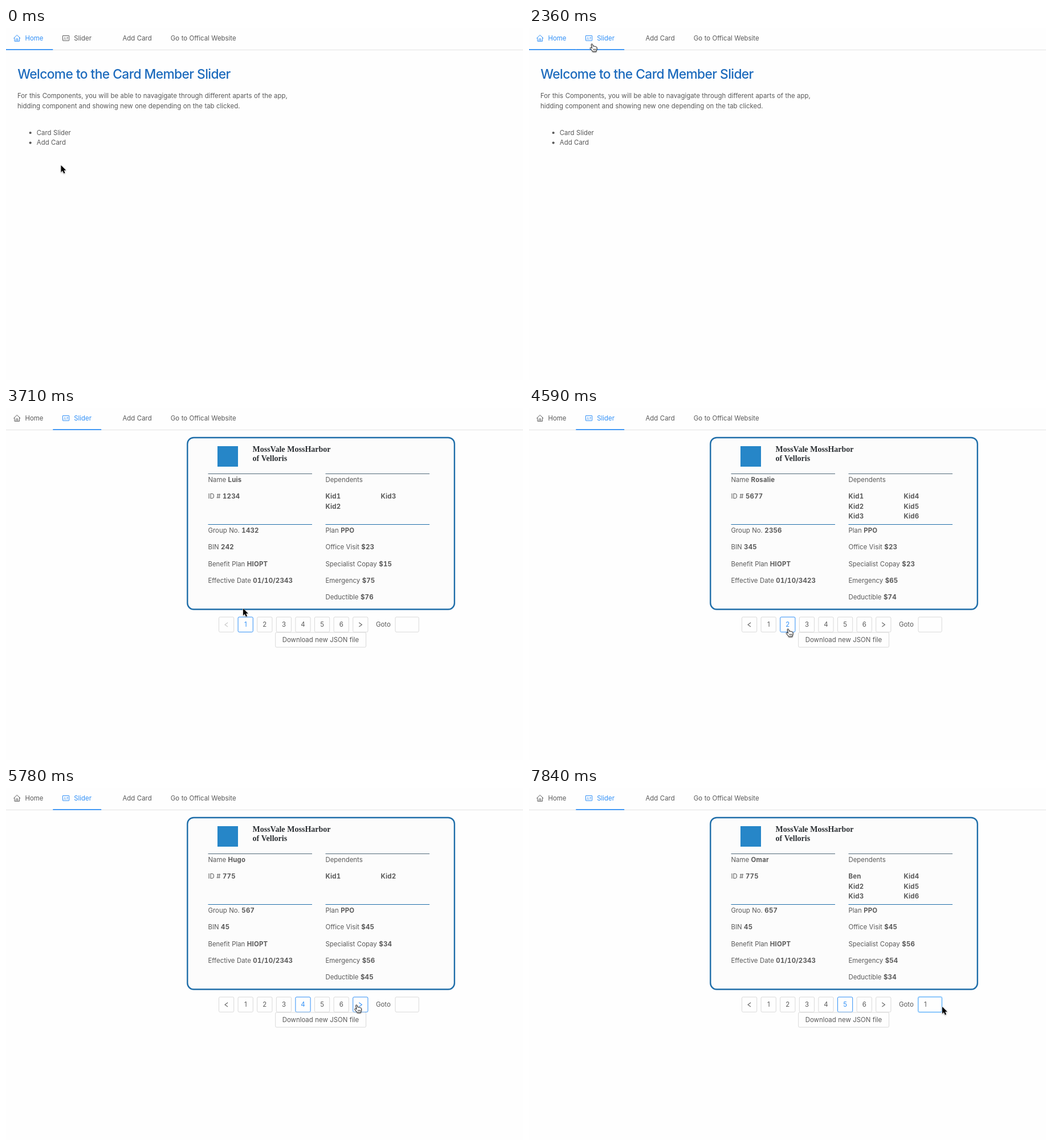
An HTML page that plays this animation: 907x618 px, repeating every 8 s.

```html
<!DOCTYPE html>
<html lang="en">
<head>
<meta charset="utf-8">
<title>Card slider</title>
<style>
html, body { margin: 0; width: 100%; height: 100%; overflow: hidden; background: #fefefe; }
svg { display: block; }
text { font: 11.4px Inter, "Open Sans", sans-serif; font-optical-sizing: none; word-spacing: .3px; fill: #595959; }
.b { font-weight: 700; letter-spacing: .2px; font-variant-numeric: tabular-nums; }
.blue { fill: #2f8ff7; }
.mid { text-anchor: middle; }
.title { font-size: 22.8px; font-weight: 500; letter-spacing: -.65px; fill: #1d6bbd; }
.brand { font: 700 14px "Liberation Serif", serif; fill: #2b2f33; }
.pointer { filter: drop-shadow(0 1px 1px #0005); }
</style>
</head>
<body>
<svg id="stage" width="907" height="618" viewBox="0 0 907 618"></svg>
<script>
const LOOP = 8000, BLUE = '#2f8ff7', GREY = '#595959', EDGE = '#d9d9d9', CARD = '#1f6ea9';
const stage = document.getElementById('stage');

// Pointer stops: time, x, y, shape
const stops = [
  [0, 96.5, 241, 'arrow'], [140, 94, 226, 'arrow'], [290, 82, 165, 'arrow'], [440, 56, 85, 'arrow'],
  [590, 34, 32, 'hand'], [740, 22, 21, 'hand'], [890, 50, 19, 'hand'], [1040, 98, 19, 'arrow'],
  [1180, 106, 22, 'hand'], [1330, 109, 25, 'hand'], [1480, 113, 36, 'hand'], [1620, 117, 65, 'arrow'],
  [1770, 120, 96, 'arrow'], [1920, 120, 110, 'arrow'], [2070, 117, 82, 'arrow'], [2210, 113, 45, 'arrow'],
  [2360, 111, 28, 'hand'], [2960, 113, 29, 'hand'], [3110, 126, 40, 'arrow'], [3260, 196, 77, 'arrow'],
  [3410, 281, 154, 'arrow'], [3560, 359, 254, 'arrow'], [3710, 416, 352, 'arrow'],
  [3860, 430, 365, 'arrow'], [4010, 448, 381, 'hand'], [4150, 455, 388, 'hand'],
  [4740, 476, 388, 'hand'], [4890, 520, 387, 'hand'], [5040, 570, 385, 'hand'], [5180, 606, 383, 'arrow'],
  [5330, 615.5, 381, 'hand'], [6680, 677, 386, 'arrow'], [6830, 697, 381, 'beam'], [6970, 703, 381, 'beam'],
  [7120, 711, 382, 'beam'], [7260, 722, 383, 'beam'], [7410, 729, 384, 'arrow'], [7550, 727, 384, 'arrow'],
  [7700, 725, 384, 'arrow']
];

// When each page of the slider opens
const turns = [2810, 4590, 5480, 5780, 6080];

// name, id, group, bin, date, visit, specialist, emergency, deductible, dependents
const cards = [
  ['Luis', '1234', '1432', '242', '01/10/2343', 23, 15, 75, 76, 'Kid1 Kid2 Kid3'],
  ['Rosalie', '5677', '2356', '345', '01/10/3423', 23, 23, 65, 74, 'Kid1 Kid2 Kid3 Kid4 Kid5 Kid6'],
  ['Clara', '3456', '2345', '234', '01/10/2343', 34, 45, 65, 54, 'Kid1 Kid2 Kid3 Kid4'],
  ['Hugo', '775', '567', '45', '01/10/2343', 45, 34, 56, 45, 'Kid1 Kid2'],
  ['Omar', '775', '657', '45', '01/10/2343', 45, 56, 54, 34, 'Ben Kid2 Kid3 Kid4 Kid5 Kid6']
];

const text = (x, y, s, cls = '') => `<text x="${x}" y="${y}" class="${cls}">${s}</text>`;
const field = (x, y, label, value) => text(x, y, `${label} <tspan class="b">${value}</tspan>`);
const path = (d, stroke, width = 1, fill = 'none', extra = '') =>
  `<path d="${d}" stroke="${stroke}" stroke-width="${width}" fill="${fill}" ${extra}/>`;
const rect = (x, y, w, h, r, stroke, width = 1, fill = 'none') =>
  `<rect x="${x}" y="${y}" width="${w}" height="${h}" rx="${r}" stroke="${stroke}" stroke-width="${width}" fill="${fill}"/>`;

function nav(home, slider) {
  const ink = on => on ? BLUE : GREY, cls = on => on ? 'blue' : '';
  const c = ink(slider);
  return path('M0 38.5H907', '#e2e2e2') +
    (home ? path('M0 37.8H82.3', BLUE, 1.7) : '') +
    (slider ? path('M82.3 37.8H167.2', BLUE, 1.7) : '') +
    path('M13.3 18.2L19.3 12.4L25.3 18.2M15 17V23.2H23.6V17M17.9 23V19H20.7V23', ink(home)) +
    rect(99.5, 13.4, 11.2, 8.8, .4, c) +
    path('M101.6 20.2Q103.3 16.8 105 20.2M102.5 16.4H104.1M106.4 16.7H109M106.4 18.9H108.6', c) +
    text(33.5, 22, 'Home', cls(home)) + text(119.3, 22, 'Slider', cls(slider)) +
    text(204.5, 22, 'Add Card') + text(288.8, 22, 'Go to Offical Website');
}

function welcome() {
  return text(20.3, 88.5, 'Welcome to the Card Member Slider', 'title') +
    text(20, 122.8, 'For this Components, you will be able to navagigate through different aparts of the app,') +
    text(20, 140.6, 'hidding component and showing new one depending on the tab clicked.') +
    ['Card Slider', 'Add Card'].map((s, i) =>
      `<circle cx="42.7" cy="${184 + i * 17.6}" r="2.1" fill="${GREY}"/>` + text(53.8, 187.6 + i * 17.6, s)).join('');
}

function card([name, id, group, bin, date, visit, specialist, emergency, deductible, names]) {
  const L = 354.5, R = 560.5, row = i => 218.7 + i * 29.4;
  const kids = names.split(' '), half = Math.ceil(kids.length / 2);
  const left = [['Group No.', group], ['BIN', bin], ['Benefit Plan', 'HIOPT'], ['Effective Date', date]];
  const right = [['Plan', 'PPO'], ['Office Visit', '$' + visit], ['Specialist Copay', '$' + specialist],
    ['Emergency', '$' + emergency], ['Deductible', '$' + deductible]];
  const column = (x, rows) => rows.map(([k, v], i) => field(x, row(i), k, v)).join('');
  return rect(318.3, 52, 468.5, 301.5, 11, CARD, 2.4, '#fcfcfc') +
    '<rect x="371" y="67" width="36" height="36" fill="#2686c8"/>' +
    text(432.5, 77.3, 'MossVale MossHarbor', 'brand') + text(432.5, 93, 'of Velloris', 'brand') +
    path('M354.5 115.5H537M560.5 115.5H743', '#50687a') +
    path('M354.5 204.5H537M560.5 204.5H743', CARD) +
    field(L, 129.6, 'Name', name) + field(L, 159, 'ID #', id) + text(R, 129.6, 'Dependents') +
    kids.map((k, i) => text(i < half ? R : 657.5, 159 + i % half * 17.6, k, 'b')).join('') +
    column(L, left) + column(R, right);
}

function pager(page, hover, t) {
  let out = '';
  for (let i = 0; i < 8; i++) {
    const x = 373.5 + i * 33.6, off = i === 0 && page === 1;
    const on = !off && (i === page || i === hover);
    out += rect(x, 367, 26.2, 26.3, 2, on ? BLUE : EDGE, 1, '#fefefe');
    const cx = x + 13.1, d = i ? 2.5 : -2.5;
    out += i % 7 ? text(cx, 384.2, i, 'mid' + (on ? ' blue' : '')) :
      path(`M${cx - d} 376.7L${cx + d} 380.4L${cx - d} 384.1`, on ? BLUE : off ? '#c4c4c4' : GREY, 1.1);
  }
  const focus = t >= 6970;
  return out + text(649, 384.2, 'Goto') +
    (focus ? rect(682.3, 366.3, 42.6, 27.7, 3, '#d3e9fd', 2) : '') +
    rect(683, 367, 41.2, 26.3, 2, focus ? '#46a6fb' : EDGE, 1, '#fefefe') +
    (t >= 7550 ? text(693, 384.2, '1') : '') +
    (focus && t < 7840 ? path(`M${t >= 7550 ? 700.5 : 693.5} 372V387`, '#333') : '') +
    rect(472.7, 394, 158.8, 26, 2, EDGE, 1, '#fefefe') +
    text(552, 411.2, 'Download new JSON file', 'mid');
}

const shapes = {
  arrow: path('M0 0V12.2L2.8 9.6L4.9 14.3L7 13.4L5 8.8H8.8Z', '#fff', 1, '#000', 'paint-order="stroke"'),
  hand: path('M-1.7 1.2C-2 -.5 0 -.7 .5 .8L1.7 4.3C2 3.4 3.8 3.5 4 4.7C4.5 3.9 6 4.2 6.2 5.3' +
    'C7 4.7 8.1 5.3 8.1 6.5V9.2C8.1 10.5 7 11.3 7 12.6V13.6H.7C.5 11.9 -2.4 9.5 -3.6 7.7' +
    'C-4.3 6.5 -2.6 5.8 -1.5 6.8L-.4 7.7Z', '#111', 1, '#fff', 'stroke-linejoin="round"') +
    path('M2.2 8.5V11.5M4 8.5V11.5M5.8 8.5V11.5', '#111', .8),
  beam: path('M-2 -7Q0 -7 0 -5.5Q0 -7 2 -7M0 -5.5V5.5M-2 7Q0 7 0 5.5Q0 7 2 7', '#222')
};

function scene(t) {
  const [, x, y, shape] = stops.filter(s => s[0] <= t).pop();
  const page = turns.filter(s => s <= t).length;
  const inRow = y > 367 && y < 394 && x < 636;
  // The next button keeps its highlight briefly after the pointer leaves
  const hover = t >= 6680 && t < 6830 ? 7 : inRow ? Math.floor((x - 373.5) / 33.6) : -1;
  const overSlider = t >= 1330 && y < 39;
  return nav(!page, page || overSlider) +
    (page ? card(cards[page - 1]) + pager(page, hover, t) : welcome()) +
    `<g class="pointer" transform="translate(${x} ${y})">${shapes[shape]}</g>`;
}

let last = '';
const start = performance.now();
function draw() {
  const next = scene(Math.max(0, performance.now() - start) % LOOP);
  if (next !== last) stage.innerHTML = last = next;
  requestAnimationFrame(draw);
}
draw();
</script>
</body>
</html>
```
